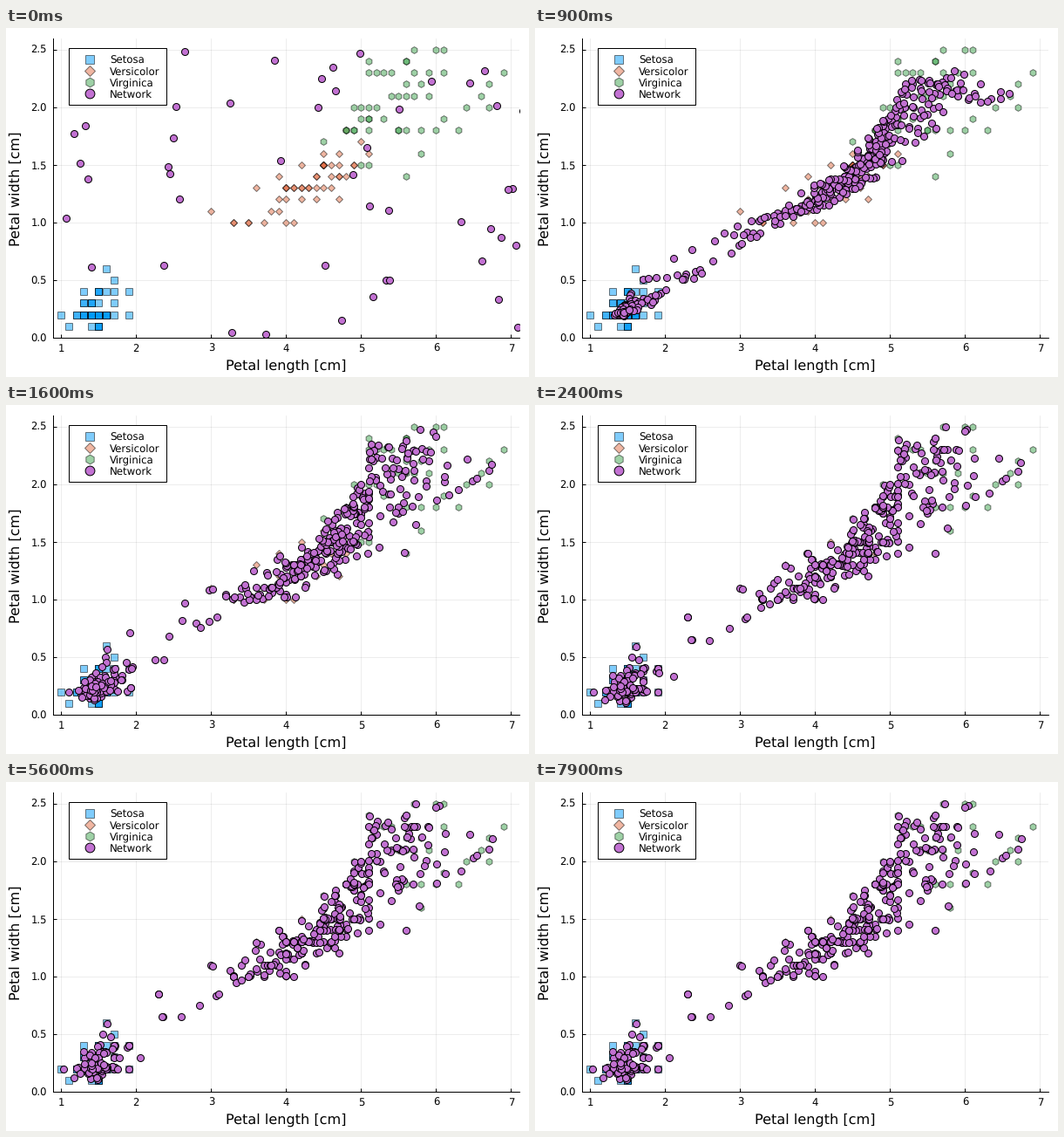
A matplotlib script for the animation above (8 s loop, 600x400 px).

```python
import numpy as np
import matplotlib.pyplot as plt
from matplotlib.animation import FuncAnimation
from matplotlib.patches import Rectangle

W, H, DPI = 600, 400, 100
FRAMES, STEP = 80, 100
PT = 72 / DPI                            # points per pixel
LEFT, RIGHT, TOP, BOTTOM = 54, 589, 11.5, 355
X_ONE, X_UNIT, Y_UNIT = 63.3, 86.02, 132.1
GRID, SWEEPS, RATE = 20, 3, .3           # map side, passes per frame, step size

plt.rcParams.update({"font.family": "DejaVu Sans", "text.hinting": "none"})
rng = np.random.default_rng(7)

# measured petals in mm, width -> lengths
SETOSA = {
    1: [11, 14] + [15] * 4,
    2: [10, 17, 19] + [12] * 2 + [13] * 4 + [14] * 8 + [15] * 6 + [16] * 5,
    3: [13] * 2 + [14] * 3 + [15, 17],
    4: [13, 16, 17, 19] + [15] * 3,
    5: [17],
    6: [16],
}
VERSICOLOR = {
    10: [33, 35] * 2 + [37, 40, 41],
    11: [30, 38, 39],
    12: [39, 40, 42, 44, 47],
    13: [36, *range(40, 47), 40, 40, 41, 42, 43],
    14: [39, 44, 44, 46, 47, 47, 48],
    15: [42, 46, 47, 49, 49] + [45] * 5,
    16: [45, 47, 51],
    17: [50],
    18: [48],
}
VIRGINICA = {
    14: [56], 15: [50, 51], 16: [58], 17: [45],
    18: [48, 49] * 2 + [51, 55, 55, 56, 58, 60, 63],
    19: [50, 51, 51, 53, 61],
    20: [49, 50, 51, 52, 64, 67],
    21: [54, 55, 56, 57, 59, 66],
    22: [56, 58, 67],
    23: [51, 52, 53, 54, 57, 59, 61, 69],
    24: [51, 56, 56],
    25: [57, 60, 61],
}


def petals(table):
    return np.array([(x, y) for y, xs in table.items() for x in xs]) / 10


def flowers(table, sepal_width):
    """Petal sizes plus plausible sepal sizes, which spread the map sideways."""
    p = petals(table)
    length = 4.3 + .41 * p[:, 0] + rng.normal(0, .35, len(p))
    width = rng.normal(sepal_width, .33, len(p))
    return np.column_stack([p, length, width])


def train():
    """Self-organising map: petal coordinates of all nodes for every frame."""
    data = np.vstack([flowers(SETOSA, 3.4), flowers(VERSICOLOR, 2.8), flowers(VIRGINICA, 3.0)])
    cells = np.indices((GRID, GRID)).reshape(2, -1).T
    apart = ((cells[:, None] - cells[None]) ** 2).sum(-1)
    nodes = rng.uniform(0, 10, (GRID * GRID, 4))
    poses = [nodes[:, :2].copy()]
    for k in range(1, FRAMES):
        reach = .45 + 6 * np.exp(-k / 4.5)
        for _ in range(SWEEPS):
            gap = ((data[:, None] - nodes[None]) ** 2).sum(-1)
            d = apart[:, gap.argmin(1)]
            pull = np.exp(-(d - d.min(1, keepdims=True)) / (2 * reach ** 2))
            goal = pull @ data / pull.sum(1, keepdims=True)
            nodes = nodes + RATE * (goal - nodes)
        poses.append(nodes[:, :2].copy())
    return poses


POSES = train()

fig = plt.figure(figsize=(W / DPI, H / DPI), dpi=DPI, facecolor="white")
ax = fig.add_axes([LEFT / W, 1 - BOTTOM / H, (RIGHT - LEFT) / W, (BOTTOM - TOP) / H])
ax.set(xlim=[1 + (px - X_ONE) / X_UNIT for px in (LEFT, RIGHT)],
       ylim=(0, (BOTTOM - TOP) / Y_UNIT),
       xticks=range(1, 8), yticks=np.arange(0, 2.6, .5))
ax.set_axisbelow(True)
ax.grid(color="black", alpha=.1, lw=.5)
ax.tick_params(direction="in", length=4 * PT, width=PT, labelsize=8.4, pad=5)
ax.spines[["top", "right"]].set_visible(False)
for side in ("left", "bottom"):
    ax.spines[side].set_linewidth(PT)

stage = fig.add_axes([0, 0, 1, 1], zorder=5)
stage.set(xlim=(0, W), ylim=(H, 0))
stage.axis("off")
title = dict(size=11.65, ha="center", va="center")
stage.text(321, 387.2, "Petal length [cm]", **title)
stage.text(11.3, 184.5, "Petal width [cm]", rotation=90, **title)
stage.add_patch(Rectangle((72, 23), 112, 65, fc="white", ec="black", lw=PT))

SERIES = [
    ("Setosa", SETOSA, "s", "#009afa", .5, 7.8, 10.8),
    ("Versicolor", VERSICOLOR, "D", "#e36f47", .5, 5.5, 8),
    ("Virginica", VIRGINICA, "h", "#3ea44e", .5, 7.8, 10.8),
    ("Network", None, "o", "#c271d2", 1, 8, 10.8),
]
for i, (name, table, mark, color, alpha, size, key) in enumerate(SERIES):
    style = dict(ls="", marker=mark, mfc=color, mec="black", mew=PT, alpha=alpha)
    xy = petals(table) if table else POSES[0]
    dots, = ax.plot(*xy.T, ms=size * PT, zorder=3 + i, **style)
    y = 36.1 + 12.9 * i
    stage.plot(96.3, y, ms=key * PT, **style)
    stage.text(119, y, name, size=8.5, va="center_baseline")


def draw(k):
    dots.set_data(*POSES[k].T)
    return dots,


anim = FuncAnimation(fig, draw, frames=FRAMES, interval=STEP, repeat=True, repeat_delay=0)
plt.show()
```
